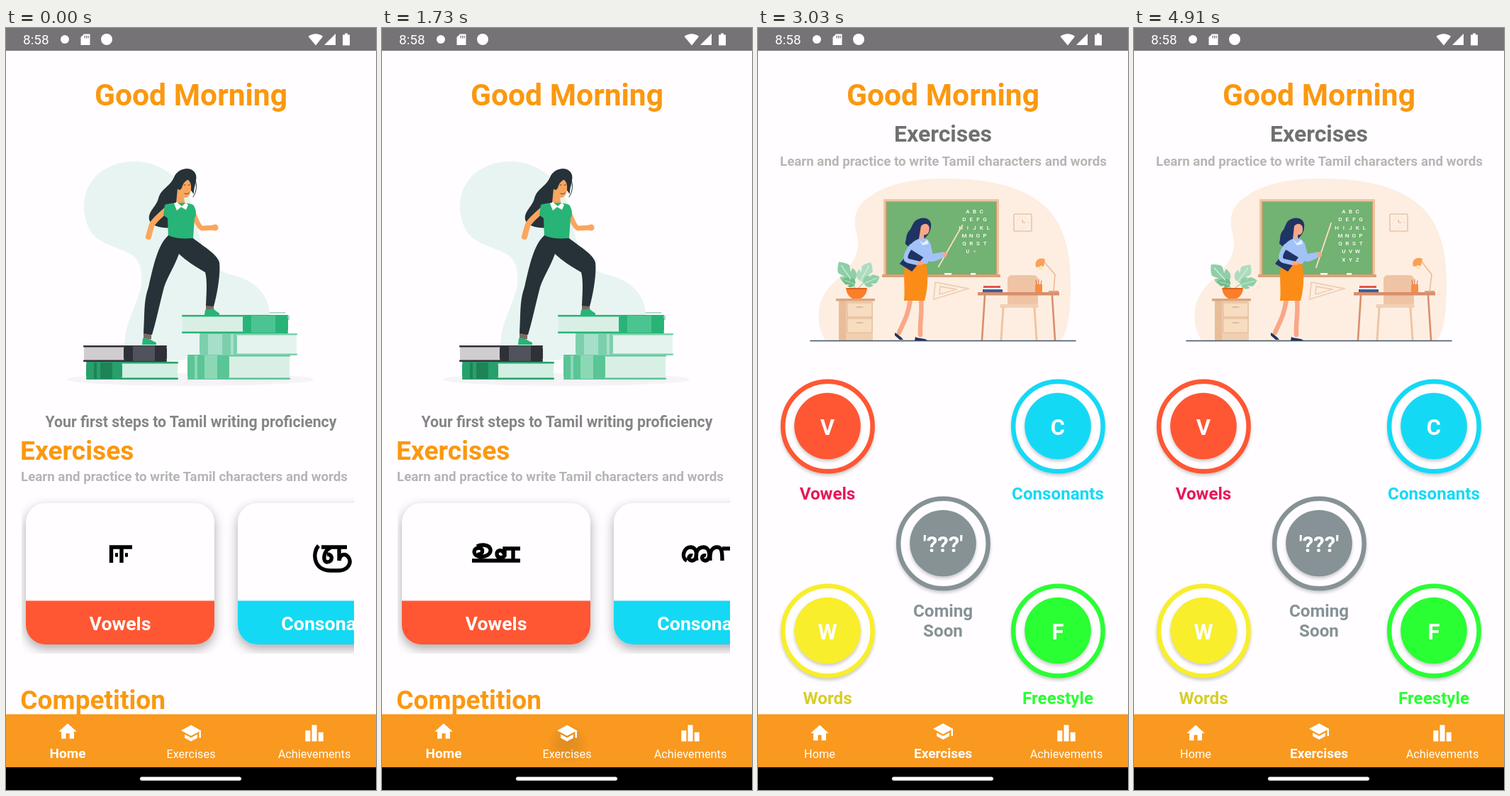
Write an HTML page that moves like this. It is 522x1073 px and loops after 4970 ms.

```html
<!DOCTYPE html>
<html lang="en">
<head>
<meta charset="utf-8">
<title>Tamil writing app</title>
<style>
html, body { margin: 0; height: 100%; overflow: hidden; background: #fffdff; }
svg { display: block; width: 100vw; height: 100vh; font-family: Roboto, sans-serif; }
.card { filter: drop-shadow(0 6px 8px #0005); }
.disc { filter: drop-shadow(0 3px 2px #0003); }
.line { fill: none; stroke-linecap: round; stroke-linejoin: round; }
.glyph { fill: none; stroke: #000; stroke-width: 5.4; }
</style>
</head>
<body>
<svg id="stage" viewBox="0 0 522 1073"></svg>
<script>
const LOOP = 4970, PAGE_AT = 1860, LESSON_AT = 1910;
const ORANGE = '#fb980f', NAVY = '#1f3464', SKIN = '#f9a788', INK = '#263238', PEACH = '#fba55e', GREEN = '#28b477';

const text = (x, y, size, fill, str, weight = 700, anchor = 'middle', extra = '') =>
  `<text x="${x}" y="${y}" font-size="${size}" fill="${fill}" font-weight="${weight}" text-anchor="${anchor}" ${extra}>${str}</text>`;
const rect = (x, y, w, h, fill, r = 0, extra = '') =>
  `<rect x="${x}" y="${y}" width="${w}" height="${h}" fill="${fill}" rx="${r}" ${extra}/>`;
const path = (d, fill, extra = '') => `<path d="${d}" fill="${fill}" ${extra}/>`;
const line = (d, color, width = 1) => `<path class="line" d="${d}" stroke="${color}" stroke-width="${width}"/>`;
const dot = (x, y, r, fill) => `<circle cx="${x}" cy="${y}" r="${r}" fill="${fill}"/>`;
const group = (id, body, extra = '') => `<g id="${id}" ${extra}>${body}</g>`;

// A lying book: pages, two cover edges, a spine with bands given as [offset, width]
function book(x, y, w, h, spineX, spineW, cover, page, band, bands) {
  return rect(x + 1, y + 1, w - 2, h - 2, page) +
    rect(x, y, w, 2.4, cover, 1) + rect(x, y + h - 2.4, w, 2.4, cover, 1) +
    rect(spineX, y, spineW, h, cover, 5) +
    bands.map(([at, size]) => rect(spineX + at, y + 1, size, h - 2, band)).join('');
}

function climber() {
  return `<ellipse cx="260" cy="495" rx="174" ry="9" fill="#f4f3f5"/>` +
    path('M110 255C108 215 140 187 182 188C225 188 262 222 270 275C275 320 290 340 320 348C350 355 372 375 372 405L380 440L235 470C200 480 166 475 167 445C170 400 195 380 191 345C188 315 165 315 145 305C122 297 112 280 110 255Z', '#e8f4f1') +
    book(109, 447, 118, 23, 166, 61, '#303138', '#d0cdd0', '#50535b', [[13, 31]]) +
    book(113, 470, 130, 25, 113, 51, '#27a06b', '#d3eee2', '#1e8458', [[11, 4], [20, 17]]) +
    book(256, 460, 145, 35, 256, 59, '#5ac596', '#d9efe6', '#8cd8b6', [[10, 4], [24, 18]]) +
    book(273, 430, 138, 31, 273, 53, '#7ccfac', '#e4f3ee', '#a5dfc9', [[12, 20], [44, 4]]) +
    book(248, 404, 150, 26, 334, 64, GREEN, '#d9efe6', '#4cc492', [[12, 34]]) +
    line('M372 401H394M399 405V411', '#65b796') +
    path('M238 208C245 196 264 194 268 207C270 216 264 225 265 234L256 222C244 226 242 238 243 250L241 280C228 283 206 282 202 270C200 258 212 252 215 240C219 225 232 224 238 208Z', INK) +
    line('M266 210C270 222 269 230 264 238', INK) +
    line('M226 256C218 264 207 272 205 279L201 294', PEACH, 8) +
    line('M264 260C268 270 272 281 277 282L294 281', PEACH, 7) + dot(295, 281, 4.6, PEACH) +
    path('M243 216C250 208 260 212 261 222C262 234 257 240 251 239L253 250C248 254 242 252 240 247Z', PEACH) +
    path('M240 218C243 201 262 199 266 211C258 211 250 216 248 225C245 231 240 227 240 218Z', INK) +
    line('M251 221L253 221M257 221L259 221M252 233C255 234 257 234 258 232', INK, .8) +
    path('M224 249C235 245 257 245 264 249C269 256 269 263 266 268L264 297H229L228 268L222 263Z', GREEN) +
    path('M237 247L241 245L248 251L254 246L257 249L254 256L247 252L241 257Z', '#fff') +
    rect(194, 430, 11, 8, '#7c6a63') + rect(282, 390, 11, 8, '#7c6a63') +
    path('M229 292C240 297 252 297 264 296C276 306 298 318 301 330C303 345 298 375 293 392L282 391C283 370 284 355 281 344C268 337 252 326 244 318C238 335 228 350 223 365C216 392 212 412 206 432L194 430C196 400 194 385 201 365C208 335 214 305 229 292Z', INK) +
    path('M193 437C200 435 205 440 212 443V446H192Z', GREEN) +
    path('M281 397L293 395C295 399 300 400 301 402V404H280Z', GREEN);
}

const vowels = [
  'M148.5 753V731H178M163 731V753M154 742h4M168 742h4',
  'M146 742C154 744 157 734 149 733C140 733 140 743 148 745C158 747 166 742 165 735C163 728 152 728 146 731M139 750H184',
  'M134 741C142 743 145 733 137 732C128 732 128 742 136 744C146 746 154 741 153 734C151 727 140 727 134 730M127 750H195M172 741C171 733 161 735 162 741C163 748 171 746 173 743V733H195M185 734V749'
];
const consonants = [
  'M441 729C432 738 433 764 458 764H468C484 764 488 752 483 745C478 739 471 741 470 750V731M445 731H481M458 732C448 735 446 752 453 752C461 752 462 741 453 741',
  'M450 729V750H476',
  'M430 750C422 746 425 731 436 731C446 732 446 750 437 750C430 749 433 741 438 743M444 750C441 738 446 731 454 731C464 732 464 750 456 750C449 749 451 741 457 743M463 750C462 736 466 731 473 731C480 731 480 740 480 750M480 733H497V750'
];

const card = (x, color, label, id) => `<g class="card">${rect(x, 669, 266, 199, '#fffdff', 27)}` +
  path(`M${x} 806.5h266v34.5a27 27 0 0 1-27 27h-212a27 27 0 0 1-27-27z`, color) + '</g>' +
  text(x + 133, 848, 26.7, '#fff', label) + `<path id="${id}" class="glyph"/>`;

const TAGLINE = 'Learn and practice to write Tamil characters and words';
const home = climber() +
  text(261, 562, 21.3, '#858585', 'Your first steps to Tamil writing proficiency') +
  text(20, 608, 37.2, ORANGE, 'Exercises', 700, 'start') +
  text(21, 637.5, 18.75, '#b5b5b5', TAGLINE, 700, 'start') +
  `<g clip-path="url(#strip)">${card(28, '#ff5733', 'Vowels', 'vowel')}${card(327, '#14d9f5', 'Consonants', 'consonant')}</g>` +
  text(20.3, 958.5, 37.1, ORANGE, 'Competition', 700, 'start');

function alphabet() {
  let n = 0;
  return ['ABC', 'DEFG', 'HIJKL', 'MNOP', 'QRST', 'UVW', 'XYZ'].map((row, r) =>
    [...row].map((c, i) => {
      const x = 305.5 + (i - (row.length - 1) / 2) * 9.7, y = 258 + r * 11.3;
      return `<g class="letter" data-n="${n++}" data-x="${x}" data-y="${y}">${text(0, 2.9, 8, '#fff', c, 500)}</g>`;
    }).join('')).join('');
}

const leaf = (x, y, turn, size, color) =>
  `<g transform="translate(${x} ${y}) rotate(${turn}) scale(${size})">` +
  path('M0 14C-9 14-13 6-10-1L-5 2L-9-6C-8-11-3-15 0-18C3-15 8-11 9-6L5 2L10-1C13 6 9 14 0 14Z', color) +
  line('M0 18V-12', '#e4f5e9', 1) + '</g>';

function teacher() {
  const legs = line('M230 382C232 402 228 415 229 432', SKIN, 6.5) + line('M215 382C212 404 206 413 199 429', SKIN, 6.5) +
    path('M193 429C197 431 202 435 205 439H200L193 433Z', NAVY) + path('M222 435C228 438 235 436 239 440H221Z', NAVY) +
    path('M208 331H237C241 350 239 370 235 384H206C208 365 204 348 208 331Z', '#fb8c17');
  const body = path('M217 272C225 265 238 266 240 276C241 284 238 290 234 294L226 305C218 312 208 308 205 303C207 296 205 290 211 284C214 278 214 276 217 272Z', NAVY) +
    path('M226 279C232 272 239 277 238 284C238 290 234 292 231 291L232 302L224 298Z', SKIN) +
    path('M218 300C228 293 238 296 241 304L245 318L261 315L263 321C254 327 244 331 240 328L238 332H208C209 324 208 306 218 300Z', '#a2c2f8') +
    path('M224 298L230 303L236 298L238 304L230 306Z', '#e6effd') +
    path('M199 332L214 312L232 323L217 343Z', NAVY) +
    line('M214 307C207 317 204 326 211 328L224 331', '#a2c2f8', 6) + line('M225 331L230 331', SKIN, 5) +
    group('pointer', line('M257 337L278 275', '#f5dcc0', 2)) +
    path('M259 316C264 314 267 318 264 322C261 324 258 322 259 316Z', SKIN);
  return legs + group('torso', body);
}

function classroom() {
  let furniture = '';
  for (const y of [387, 409]) furniture += rect(126, y, 35, 20, '#f7dcc0', 0, 'stroke="#e3b995"') + line(`M139 ${y + 6}H148`, '#cf9a75');
  return path('M138 285C134 262 140 248 160 236C185 218 225 212 265 212C330 212 385 225 415 262C436 290 441 325 441 360C441 400 437 428 428 440H95C80 415 82 382 105 360C140 330 146 310 138 285Z', '#fdeee1') +
    rect(177, 241, 163, 108, '#efc39f') + rect(180, 244, 157, 103, '#d49b72') + rect(181.5, 245, 154.5, 102, '#72b272') +
    rect(175, 347, 167, 4, '#dca07a') + rect(263, 345, 10, 2.5, '#fff') + rect(300, 345, 7, 2.5, '#fff') + alphabet() +
    rect(361, 262, 25, 24, '#fdeee1', 1, 'stroke="#eac5a8" stroke-width="1.6"') +
    `<circle cx="373.5" cy="274" r="8" fill="none" stroke="#eac5a8" stroke-dasharray="1 3"/>` + line('M373 270V274H377', '#dfae8b') +
    line('M250 358L297 367L248 382ZM257 364L280 368L256 375Z', '#efcfb5', 1.8) +
    rect(114, 384, 48, 56, '#efcfb0') + rect(114, 384, 10, 56, '#e8bd97') + rect(110, 381, 55, 3.5, '#dca581') + furniture +
    group('leavesL', leaf(127, 344, -30, 1.08, '#8fcfa8') + leaf(130, 357, -64, .6, '#72bb8a') + line('M129 353L139 369', '#82c596')) +
    group('leavesR', leaf(149, 344, 24, .95, '#aedcc0') + leaf(158, 354, 62, .75, '#8fcfa8') + line('M150 356L139 369', '#82c596')) +
    path('M124 366H154C154 374 149 379 145 381H133C128 378 125 374 124 366Z', '#fb7f2b') + line('M126 367H152', '#d9601c', 2) +
    rect(352, 348, 43, 44, '#efc4a4', 6) + rect(341, 389, 55, 5, '#f3d0b4', 2) +
    line('M346 394L343 439M390 394L393 439', '#efc4a4', 3) +
    rect(310, 372, 115, 4.5, '#d98e6c') + line('M320 377L316 439M415 377L419 439', '#d98e6c', 2.6) +
    rect(318, 363, 24, 3, '#e2574c') + rect(321, 366, 24, 3, '#fff') + rect(317, 368, 28, 4, '#3c5c9c') +
    rect(391, 361, 10, 11, '#fb8c3c', 1) + line('M393 361L392 355M396 361V354M399 361L400 356', '#d9643c') +
    rect(410, 370, 14, 2.5, '#dca07a') +
    group('lamp', line('M417 371L420 347L405 328', '#efb592', 1.5) + path('M394 336C391 327 398 321 407 325L405 334C402 339 398 334 394 336Z', '#fba057') + dot(401, 337, 3, '#fde4b8')) +
    teacher() + line('M74 440.5H448', '#3e5068', 1.6);
}

const button = (x, y, color, mark, label, ink, lines = [label]) =>
  `<g class="disc"><circle cx="${x + .4}" cy="${y}" r="63.2" fill="#fffdff" stroke="${color}" stroke-width="6.5"/></g>` +
  `<g class="disc">${dot(x, y - .5, 46.8, color)}</g>` + text(x, y + 12, 31, '#fff', mark) +
  lines.map((s, i) => text(x, y + 103 + i * 28, 24.2, ink, s)).join('');

const exercises = text(261, 160, 32, '#707070', 'Exercises') + text(261.5, 194, 18.75, '#b8b5b5', TAGLINE) +
  classroom() +
  button(98, 561, '#ff5733', 'V', 'Vowels', '#e8175a') +
  button(423, 561, '#14d9f5', 'C', 'Consonants', '#14d9f5') +
  button(261, 726, '#869295', "'???'", '', '#869295', ['Coming', 'Soon']) +
  button(98, 849, '#f8ee2c', 'W', 'Words', '#d6ce28') +
  button(423, 849, '#29ff33', 'F', 'Freestyle', '#29ff33');

const tabs = [
  ['Home', 'M10 20v-6h4v6h5v-8h3L12 3 2 12h3v8z'],
  ['Exercises', 'M5 13.2v4L12 21l7-3.8v-4L12 17zM12 3L1 9l11 6 9-4.9V17h2V9z'],
  ['Achievements', 'M7.5 21H2V9h5.5zM14.75 3h-5.5v18h5.5zM22 11h-5.5v10H22z']
];
const nav = rect(0, 966.3, 522, 75, '#f9991f') +
  `<circle id="ripple" cx="262" cy="1008" fill="url(#shade)" clip-path="url(#bar)"/>` +
  tabs.map(([name, icon], i) => {
    const x = 87 + i * 174;
    return `<g id="tab${i}">${path(icon, '#fff')}` +
      text(x, 1028, 16.3, '#fff', name, 400) + text(x, 1027.5, 19, '#fff', name) + '</g>';
  }).join('') +
  rect(0, 1041, 522, 32, '#000') + rect(189, 1054.5, 143, 5.2, '#fff', 2.6);

const status = rect(0, 0, 522, 32, '#757375') + text(24, 23, 19, '#fff', '8:58', 400, 'start') +
  dot(83, 16, 6, '#fff') + dot(142, 16, 8, '#fff') +
  path('M110 8.5H118.5V24H105.5V13Z', '#fff') + line('M111 11V14M113.5 11V14M116 11V14', '#757375', 1.2) +
  path('M426.5 12C433 7 441 7 447 12L437 24.5Z', '#fff') + path('M465 8V24H449Z', '#fff') +
  path('M478 7.5h4v2h3V24.5h-10V9.5h3z', '#fff');

const $ = id => document.getElementById(id);
$('stage').innerHTML = `<defs>
  <clipPath id="strip"><rect x="22" y="660" width="469" height="221"/></clipPath>
  <clipPath id="bar"><rect y="967" width="522" height="74"/></clipPath>
  <radialGradient id="shade"><stop stop-color="#5a4630" stop-opacity=".36"/><stop offset=".5" stop-color="#5a4630" stop-opacity=".24"/><stop offset="1" stop-color="#5a4630" stop-opacity="0"/></radialGradient>
  </defs>` + rect(0, 0, 522, 1073, '#fffdff') + text(261, 109.3, 42.6, ORANGE, 'Good Morning') +
  group('home', home) + group('exercises', exercises) + nav + status;

const letters = [...document.querySelectorAll('.letter')];
const clamp = v => Math.max(0, Math.min(1, v));
const move = (id, value) => $(id).setAttribute('transform', value);
const show = (id, on) => $(id).style.display = on ? '' : 'none';

function setTab(i, active) {
  const [icon, plain, bold] = $('tab' + i).children;
  icon.setAttribute('transform', `translate(${71.8 + i * 174} ${977.8 - 2.4 * active}) scale(1.27)`);
  plain.setAttribute('opacity', 1 - active);
  bold.setAttribute('opacity', active);
}

function draw() {
  const t = performance.now() % LOOP;
  show('home', t < PAGE_AT);
  show('exercises', t >= PAGE_AT);

  const step = t < 350 ? 0 : t < 1050 ? 1 : 2;
  $('vowel').setAttribute('d', vowels[step]);
  $('consonant').setAttribute('d', consonants[step]);

  const grow = clamp((t - 1680) / 230), fade = clamp((2240 - t) / 250);
  $('ripple').setAttribute('r', 20 + 42 * grow);
  $('ripple').setAttribute('opacity', t < 1680 ? 0 : Math.min(1, grow * 2) * fade);

  const active = clamp((t - 2020) / 120);
  setTab(0, 1 - active);
  setTab(1, active);
  setTab(2, 0);

  const u = clamp((t - LESSON_AT) / 3000);
  const lean = (1 - Math.cos(u * 2 * Math.PI)) / 2;
  move('torso', `translate(0 345) skewX(${-4 * lean}) translate(0 -345)`);
  move('pointer', `rotate(${10 * lean} 262 318)`);
  move('lamp', `rotate(${-3 * lean} 418 371)`);
  move('leavesL', `rotate(${-13 * u} 139 368)`);
  move('leavesR', `rotate(${13 * u} 139 368)`);
  for (const el of letters) {
    const { n, x, y } = el.dataset;
    el.setAttribute('transform', `translate(${x} ${y}) scale(${clamp((t - 1915 - n * 50) / 130)})`);
  }
  requestAnimationFrame(draw);
}
draw();
</script>
</body>
</html>
```
